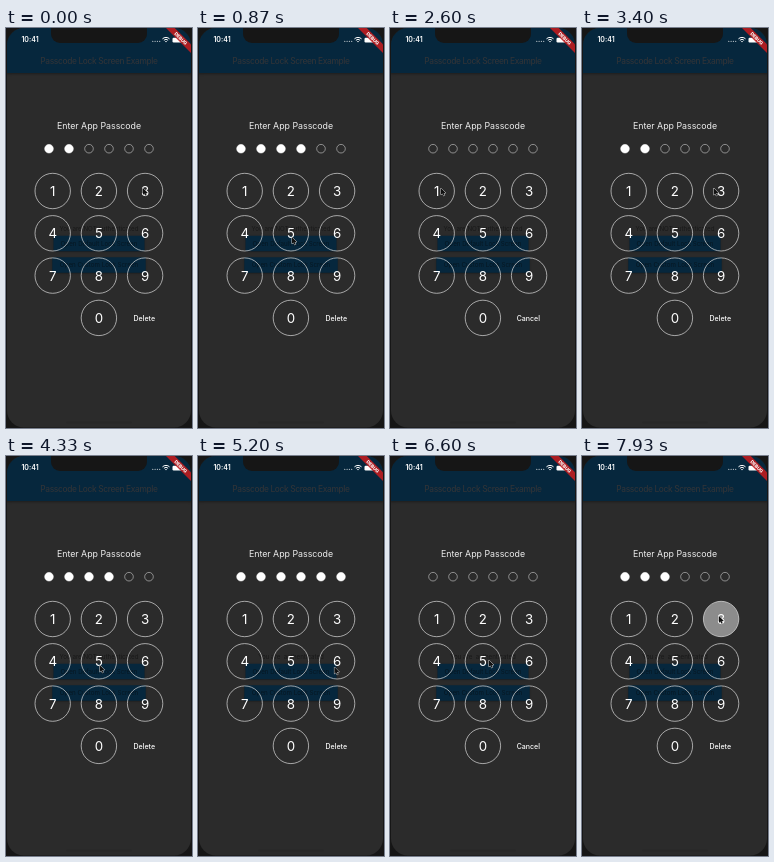
Animation of 186x400 px, one loop 8000 ms. Source, as an HTML page with a canvas:

```html
<!DOCTYPE html>
<html lang="en">
<head>
<meta charset="utf-8">
<title>Passcode lock screen</title>
<style>
  html, body { margin: 0; width: 100%; height: 100%; overflow: hidden; background: #161616; }
  canvas { display: block; width: 186px; height: 400px; }
</style>
</head>
<body>
<canvas id="stage"></canvas>
<script>
const W = 186, H = 400, LOOP = 8000;
const canvas = document.getElementById('stage');
const ctx = canvas.getContext('2d');
const ratio = window.devicePixelRatio || 1;
canvas.width = W * ratio;
canvas.height = H * ratio;

const BEZEL = '#161616';
const BRIGHT = { page: '#f7f7f7', accent: '#2089ee', title: '#fff', label: '#222', button: '#0c1c2c', bar: '#000' };
const DIMMED = { page: '#2b2b2b', accent: '#06273d', title: '#2f3338', label: '#191919', button: '#061722', bar: '#282828' };

const SHAKE_START = 1390, CLEARED = 1890, VERIFIED = 5000, CLOSED = 5400, OPENED = 6440;
const REST = 150, MAX_TRAVEL = 700;

const clamp01 = v => Math.max(0, Math.min(1, v));
const smooth = v => v * v * (3 - 2 * v);
const mix = (a, b, k) => a + (b - a) * k;
const cell = digit => digit ? [(digit - 1) % 3, Math.floor((digit - 1) / 3)] : [1, 3];

// The hand aims at a grid slightly different from that of the keys
function typeCode(code, start, interval) {
  return [...code].map((char, i) => {
    const digit = Number(char), [col, row] = cell(digit);
    return { time: start + i * interval, digit, x: 94 + (col - 1) * 43, y: 160 + row * 49 };
  });
}

const wrongCode = typeCode('3555', 265, 360);
const rightCode = typeCode('123456', 2735, 440);
const nextCode = typeCode('123', 7130, 397);
const taps = [...wrongCode, ...rightCode, ...nextCode];
const goals = [
  ...wrongCode, ...rightCode,
  { time: 5950, x: 127, y: 244.5 },
  { time: OPENED, x: 112, y: 216 },
  ...nextCode
];

function pointerAt(t) {
  const next = goals.findIndex(goal => goal.time > t);
  if (next === 0) return goals[0];
  if (next < 0) return goals[goals.length - 1];
  const from = goals[next - 1], to = goals[next];
  const arrive = to.time - REST;
  const travel = Math.min(arrive - from.time, MAX_TRAVEL);
  const k = smooth(clamp01((t - arrive + travel) / travel));
  return { x: mix(from.x, to.x, k), y: mix(from.y, to.y, k) };
}

function enteredAt(t) {
  const count = code => code.filter(tap => tap.time <= t).length;
  if (t < CLEARED) return 2 + count(wrongCode);
  return t < CLOSED ? count(rightCode) : count(nextCode);
}

function highlightAt(t, digit) {
  const levels = taps.filter(tap => tap.digit === digit && tap.time <= t)
    .map(tap => clamp01((200 - t + tap.time) / 125));
  return Math.max(0, ...levels);
}

function text(str, x, y, size, color, weight = 400, spacing = 0) {
  ctx.font = `${weight} ${size}px Inter, Roboto, sans-serif`;
  ctx.letterSpacing = spacing + 'px';
  ctx.textAlign = 'center';
  ctx.textBaseline = 'alphabetic';
  ctx.fillStyle = color;
  ctx.fillText(str, x, y + size * 0.364);
}

function circle(x, y, r, fill, stroke, width = 0.7) {
  ctx.beginPath();
  ctx.arc(x, y, r, 0, Math.PI * 2);
  if (fill) { ctx.fillStyle = fill; ctx.fill(); }
  if (stroke) { ctx.strokeStyle = stroke; ctx.lineWidth = width; ctx.stroke(); }
}

function box(x, y, w, h, r, fill) {
  ctx.beginPath();
  ctx.roundRect(x, y, w, h, r);
  ctx.fillStyle = fill;
  ctx.fill();
}

function shadowed(blur, dy, draw) {
  ctx.save();
  ctx.shadowColor = 'rgba(0,0,0,.35)';
  ctx.shadowBlur = blur * ratio;
  ctx.shadowOffsetY = dy * ratio;
  draw();
  ctx.restore();
}

function drawHome(t, colors) {
  ctx.fillStyle = colors.page;
  ctx.fillRect(0, 0, W, H);
  shadowed(2.5, 1, () => box(0, 0, W, 45, 0, colors.accent));
  text('Passcode Lock Screen Example', 93, 33, 8.4, colors.title, 500, -0.36);
  const state = t >= VERIFIED ? '' : 'NOT';
  text(`You are ${state} authenticated`, 93, 200.5, 6.2, colors.label);
  shadowed(1.5, 0.8, () => {
    box(47.5, 207.8, 91, 15.5, 1, colors.accent);
    box(46.3, 229.2, 93.4, 15.5, 1, colors.accent);
  });
  text('Open Default Lock Screen', 93, 215.5, 6.2, colors.button);
  text('Open Custom Lock Screen', 93, 237, 6.2, colors.button);
  box(60, 393.3, 66, 2.4, 1.2, colors.bar);
}

function drawLock(t) {
  text('Enter App Passcode', 93, 97.7, 8.8, '#eee');

  const entered = enteredAt(t);
  const shake = clamp01((t - SHAKE_START) / (CLEARED - SHAKE_START));
  const lift = shake < 1 ? 2.2 * Math.abs(Math.sin(shake * 2.5 * Math.PI)) : 0;
  for (let i = 0; i < 6; i++) {
    const filled = i < entered;
    circle(43 + i * 20, 120.7 - lift, 4.3, filled && '#fff', filled ? '#fff' : '#ccc', 0.6);
  }

  for (let digit = 0; digit < 10; digit++) {
    const [col, row] = cell(digit);
    const x = 46.7 + col * 46.2, y = 163 + row * 42.3;
    const glow = highlightAt(t, digit);
    circle(x, y, 17.7, glow > 0 && `rgba(255,255,255,${0.46 * glow})`, '#ddd');
    text(String(digit), x, y + 0.2, 13.3, '#fff');
  }
  text(entered ? 'Delete' : 'Cancel', 138.3, 290, 7, '#fff', 500);
}

function drawStatus() {
  text('10:41', 24, 11.8, 7, '#fff', 600);
  for (let i = 0; i < 4; i++) circle(146.8 + i * 2.3, 13.3, 0.65, 'rgba(255,255,255,.75)');
  ctx.strokeStyle = '#fff';
  ctx.lineWidth = 1;
  for (let r = 1; r <= 5; r += 2) {
    ctx.beginPath();
    ctx.arc(160, 14.4, r, -Math.PI * 0.75, -Math.PI * 0.25);
    ctx.stroke();
  }
  box(166.5, 9.7, 9.5, 4.8, 1.2, '#fff');
}

function drawRibbon() {
  ctx.save();
  ctx.translate(174.8, 10.4);
  ctx.rotate(Math.PI / 4);
  ctx.fillStyle = 'rgba(190,28,32,.9)';
  ctx.fillRect(-24, -3.1, 48, 6.2);
  text('DEBUG', 0, 0, 4.6, '#fff', 800);
  ctx.restore();
}

function drawPointer({ x, y }) {
  ctx.save();
  ctx.translate(x, y);
  ctx.beginPath();
  ctx.moveTo(0, 0);
  ctx.lineTo(0, 6.8);
  ctx.lineTo(1.5, 5.4);
  ctx.lineTo(2.6, 7.8);
  ctx.lineTo(3.6, 7.3);
  ctx.lineTo(2.6, 5);
  ctx.lineTo(4.8, 4.9);
  ctx.closePath();
  ctx.lineJoin = 'round';
  ctx.strokeStyle = '#e4e4e4';
  ctx.lineWidth = 0.9;
  ctx.stroke();
  ctx.fillStyle = '#111';
  ctx.fill();
  ctx.restore();
}

function render(t) {
  const locked = t < CLOSED || t >= OPENED;
  ctx.setTransform(ratio, 0, 0, ratio, 0, 0);
  ctx.fillStyle = BEZEL;
  ctx.fillRect(0, 0, W, H);
  ctx.save();
  ctx.beginPath();
  ctx.roundRect(1, 0, 184, 399.5, 17);
  ctx.clip();
  drawHome(t, locked ? DIMMED : BRIGHT);
  if (locked) drawLock(t);
  drawStatus();
  drawRibbon();
  box(45, -2, 96, 17, [0, 0, 9, 9], BEZEL);
  ctx.restore();
  drawPointer(pointerAt(t));
}

const start = performance.now();
function tick() {
  render((performance.now() - start) % LOOP);
  requestAnimationFrame(tick);
}
tick();
</script>
</body>
</html>
```
